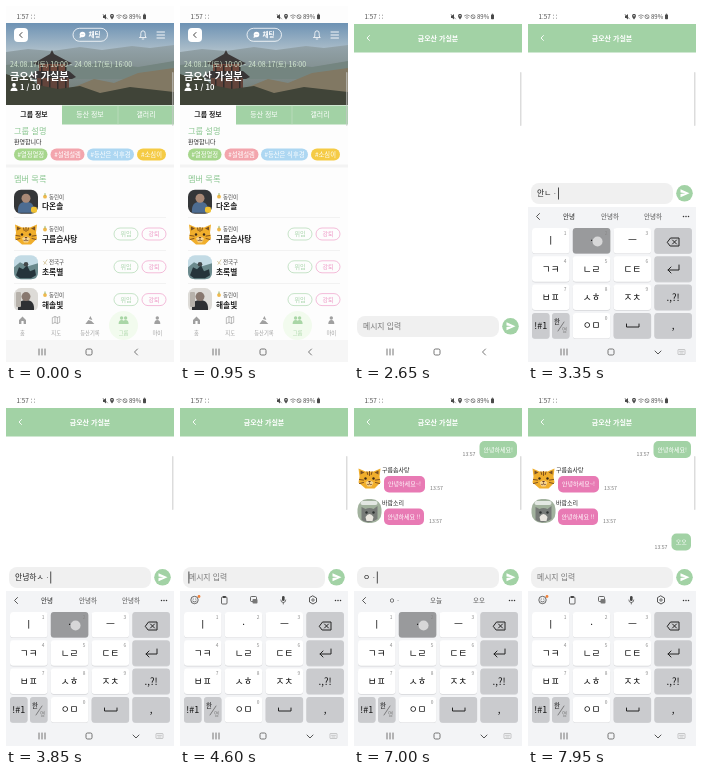
These frames come from a looping animation (168 by 356 pixels, 8000 ms). An HTML page:

```html
<!DOCTYPE html>
<html lang="ko">
<head>
<meta charset="utf-8">
<style>
html, body { margin: 0; width: 100%; height: 100%; overflow: hidden; background: #fff; }
svg { display: block; width: 168px; height: 356px; font-family: "Noto Sans CJK KR", "Noto Sans CJK", sans-serif; white-space: pre; }
</style>
</head>
<body>
<svg id="stage" viewBox="0 0 168 356"></svg>
<script>
const LOOP = 8000;
const GREEN = '#a2d2a5', PINK = '#e87ab4', INK = '#222';
const stage = document.getElementById('stage');

// y is the vertical middle of the text
const text = (s, x, y, size, fill = INK, weight = 400, anchor = 'start') =>
  `<text x="${x}" y="${(y + size * .36).toFixed(2)}" font-size="${size}" fill="${fill}" font-weight="${weight}" text-anchor="${anchor}">${s}</text>`;
const mid = (s, x, y, size, fill, weight) => text(s, x, y, size, fill, weight, 'middle');
const rect = (x, y, w, h, fill, r = 0, extra = '') =>
  `<rect x="${x}" y="${y}" width="${w}" height="${h}" rx="${r}" fill="${fill}" ${extra}/>`;
const frame = (x, y, w, h, r, color, width = .8) => rect(x, y, w, h, 'none', r, `stroke="${color}" stroke-width="${width}"`);
const disc = (x, y, r, fill, extra = '') => `<circle cx="${x}" cy="${y}" r="${r}" fill="${fill}" ${extra}/>`;
const ring = (x, y, r, color, w = .8) => disc(x, y, r, 'none', `stroke="${color}" stroke-width="${w}"`);
const shape = (d, fill) => `<path d="${d}" fill="${fill}"/>`;
const line = (d, color, w = .8) =>
  `<path d="${d}" fill="none" stroke="${color}" stroke-width="${w}" stroke-linecap="round" stroke-linejoin="round"/>`;
const at = (x, y, body) => `<g transform="translate(${x} ${y})">${body}</g>`;

function statusBar() {
  const c = '#4a4a4a';
  return text('1:57', 10.5, 10.5, 6.3, c)
    + [25, 28].map(x => rect(x, 8.7, 1, 1, '#999') + rect(x, 11.7, 1, 1, '#999')).join('')
    + shape('M97 9.5h1.3l1.7-1.5v5.4l-1.7-1.5H97z', c) + line('M97 8.3l4.5 4.6', c, .6)
    + shape('M106 13.5c-3.2-3.6-1.8-5.6 0-5.6s3.200 2 0 5.600z', c) + disc(106, 9.8, .7, '#fff')
    + line('M110.5 9.7q2.500-2 5 0M111.7 11.2q1.300-1.200 2.600 0', c, .6) + disc(113, 12.5, .5, c)
    + ring(119, 10.7, 2, c, .6) + line('M117.7 9.400l2.600 2.600', c, .6)
    + text('89%', 123, 10.5, 6, c) + rect(137, 8.4, 3, 4.8, c, .7) + rect(137.9, 7.7, 1.2, 1, c);
}

const systemNav = typing =>
  [33, 36, 39].map(x => line(`M${x} 343v6`, '#555', .8)).join('')
  + frame(80, 343, 6, 6, 1.5, '#555')
  + (typing
    ? line('M127 345l3 3 3-3', '#444', .9) + frame(150, 343.5, 7, 5, .6, '#999', .5) + line('M152 347h3M151.5 345.3h4', '#999', .5)
    : line('M131.5 343l-3 3 3 3', '#555', .8));
const edgeHandle = rect(166, 66, 1.5, 54, '#c9c9c9', .7, 'opacity=".65"');

const tiger = shape('M2 10L1 2l7 3h8l7-3-1 8 1 6-6 6H8l-7-6z', '#f0ae2c')
  + shape('M3 8V4l4 2zM21 8V4l-4 2z', '#7a5122')
  + line('M12 5v4M9.5 5.5l.7 2.5M14.5 5.5l-.7 2.5M2 13l4 .6M2 17l4-1M22 13l-4 .6M22 17l-4-1', '#80511d', 1)
  + shape('M8 16q4-4 8 0l-2 4h-4z', '#f8d58b') + disc(8, 12, 1.2, '#3b2a18') + disc(16, 12, 1.2, '#3b2a18')
  + shape('M10.5 14.5h3L12 16.3z', '#5a2f25') + line('M9.8 18q2.2 1.2 2.2-1.2 0 2.4 2.2 1.2', '#5a2f25', .6);

const photo = (back, body, face) => rect(0, 0, 24, 24, back, 7)
  + shape('M4 23q-1-11 8-11t8 11z', body) + disc(12, 8.5, 4.5, face);
const hiker = photo('#343638', '#4d6c91', '#a98976') + rect(17, 17, 6, 6, '#f1c232', 2);
const road = rect(0, 0, 24, 24, '#c3dbe5', 7) + shape('M0 12l6-5 8 4 10-3v9q0 7-7 7H7q-7 0-7-7z', '#6b8a8d')
  + shape('M2 20l3-8 4 2 4-4 3 6 5-2 1 6-5 3H6z', '#25343b') + disc(12, 9, 2.3, '#43484a');
const climber = photo('#dddbd7', '#2e3033', '#88786f') + rect(2, 4, 5, 15, '#b7b2ab', 1);
const grayCat = rect(0, 0, 24, 24, '#a2b29e', 10) + shape('M4 21V8l4 2q4-2 8 0l4-3v13q-8 6-16 1z', '#777b78')
  + shape('M8 18q4-6 8 0l-1 4H9z', '#e9e6df') + disc(9, 13.5, 1.2, '#2d3231') + disc(16, 13.5, 1.2, '#2d3231')
  + rect(3, 2, 17, 4, '#e3e8e3', 2);

const gradient = (id, from, to) =>
  `<linearGradient id="${id}" x2="0" y2="1"><stop stop-color="${from}"/><stop offset="1" stop-color="${to}"/></linearGradient>`;

const pavilion = shape('M46 44l2 4 15 8 3 1-4 2H31l-4-2 3-1 14-8z', '#3b3737')
  + rect(33, 58, 27, 9, '#70483c') + shape('M30 65h33l7 6-4 2H28l-4-2z', '#393637') + rect(31, 72, 32, 13, '#62443b')
  + [35, 43, 51, 59].map(x => rect(x, 59, 1.5, 26, '#302c2b')).join('');

const scenery = () => `<defs>${gradient('sky', '#6d92b4', '#b9c7ce')}${gradient('plain', '#93a3aa', '#6b756c')}</defs>`
  + rect(0, 17, 168, 33, 'url(#sky)')
  + shape('M0 46l22-3 24 2 28-4 22 3 30-4 18 2 24-3v60H0z', 'url(#plain)')
  + shape('M0 59l26-3 30 5 38-4 38 4 36-6v18H0z', '#748580')
  + shape('M66 82l22-9 20 4 24-10 36-5v37H60z', '#817863')
  + pavilion
  + shape('M0 68l12 4 8-3 12 10 20 4 22-3 20 7 30-6 44 5v13H0z', '#404438');

function hero() {
  return scenery()
    + rect(8, 22, 14, 14, '#fff', 4) + line('M16 26.5l-2.5 2.5 2.5 2.5', '#444', 1)
    + frame(67, 22.3, 34.5, 13, 6.5, '#fff', .8) + disc(76.5, 28.5, 2.8, '#fff') + shape('M74 29.5l-.5 2.5 2.5-1z', '#fff')
    + [75.2, 76.5, 77.8].map(x => disc(x, 28.5, .35, '#6f8ca5')).join('')
    + mid('채팅', 88.5, 28.7, 6.5, '#fff', 700)
    + line('M133.8 31.5h6.4l-1-1.5v-2.5q0-2.7-2.2-2.7t-2.2 2.7V30zM136.2 33h1.6', '#fff', .8)
    + line('M151 26h7.5M151 29h7.5M151 32h7.5', '#fff', .9)
    + text('24.08.17(토) 10:00 - 24.08.17(토) 16:00', 4, 58.8, 7, '#d5ead2')
    + text('금오산 가실분', 4, 70, 10.1, '#fff', 700)
    + disc(8, 79, 1.9, '#fff') + shape('M4.5 85q0-3.5 3.5-3.5t3.5 3.5z', '#fff')
    + text('1 / 10', 14, 81.3, 7.5, '#fff', 700);
}

const chips = [['#열정열정', 8, 33.5, '#a6d68c'], ['#설렘설렘', 44.5, 34, '#f3a5ad'], ['#등산은 식후경', 81, 47, '#add7f2'], ['#소심이', 131, 29, '#f5cb45']];
const members = [['동린이', '다온솔', hiker], ['동린이', '구름솜사탕', tiger], ['전국구', '초록별', road], ['동린이', '해솔빛', climber]];

function memberRow([level, name, avatar], i) {
  const y = 183.7 + i * 32.8;
  const pill = (label, x, c) => frame(x, y + 5.5, 24, 12, 6, c, .6) + mid(label, x + 12, y + 11.5, 6, c);
  const badge = i === 2 ? line('M38 9l3-4.5M37.5 6l3 3', '#c9b685', .7) : disc(39, 7, 1.9, '#efb84b') + line('M39 5.5V3.8', '#8eae5d', .9);
  return at(8, y, avatar) + at(0, y, badge) + text(level, 43, y + 7, 5.5, '#444', 500) + text(name, 36, y + 17, 7.7, INK, 700)
    + (i ? pill('위임', 108, '#a2d2a5') + pill('강퇴', 136, '#ed91c2') : '')
    + (i < 3 ? rect(8, y + 27.7, 152, .5, '#e6e6e6') : '');
}

function bottomNav() {
  const c = '#a0a0a0', active = '#a9d6a6';
  const person = (x, color) => disc(x, -2, 1.7, color) + shape(`M${x - 3} 4q0-4 3-4t3 4z`, color);
  const items = [
    ['홈', shape('M-3.5 0L0-3.5 3.5 0v4h-2.4V1h-2.2v3h-2.4z', c)],
    ['지도', line('M-3.500-2.500l2.300-1 2.400 1 2.300-1v6l-2.300 1-2.400-1-2.300 1zM-1.200-3.500v6M1.200-2.500v6', c, .7)],
    ['등산기록', shape('M-4.5 4l3-4 3 1 3 3zM-1-1l1.500-3 2 4z', c)],
    ['그룹', person(-2, active) + person(2, active)],
    ['마이', person(0, c)],
  ];
  return rect(0, 304, 168, 30, '#fdfdfd') + rect(0, 334, 168, 22, '#f6f6f6') + disc(117.5, 319.5, 14.5, '#f2fbee')
    + items.map(([label, icon], i) => {
      const x = 16.5 + i * 33.7;
      return at(x, 314, icon) + mid(label, x, 327, 5.3, i === 3 ? active : c);
    }).join('') + systemNav(false);
}

const groupScreen = () => rect(0, 0, 168, 356, '#fdfdfd') + statusBar() + hero()
  + rect(0, 99.5, 56, 19, '#fdfdfd') + rect(56, 99.5, 112, 19, GREEN) + rect(111.7, 99.5, .6, 19, '#c5e2c7')
  + mid('그룹 정보', 28, 109, 6.9, INK, 700) + mid('등산 정보', 84, 109, 6.9, '#fff') + mid('갤러리', 140, 109, 6.9, '#fff')
  + text('그룹 설명', 8, 125.5, 8.2, '#8cc792', 500) + text('환영합니다', 8, 136, 6)
  + chips.map(([s, x, w, c]) => rect(x, 142.5, w, 12, c, 6) + mid(s, x + w / 2, 148.5, 6.3, '#fff')).join('')
  + rect(0, 158.5, 168, 3, '#f3f3f3') + text('멤버 목록', 8, 173, 8.2, '#8cc792', 500)
  + members.map(memberRow).join('') + bottomNav() + edgeHandle;

// [key, text after the tap]
const hello = [['0', 'ㅇ'], ['1', '이'], ['2', '아'], ['5', '안'], ['5', '안ㄴ'], ['2', '안ㄴㆍ'], ['2', '안ㄴ‥'], ['1', '안녀'], ['0', '안녕'],
  ['8', '안녕ㅅ'], ['8', '안녕ㅎ'], ['1', '안녕히'], ['2', '안녕하'], ['8', '안녕핫'], ['2', '안녕하ㅅㆍ'], ['1', '안녕하서'], ['1', '안녕하세'],
  ['0', '안녕하셍'], ['2', '안녕하세ㅇㆍ'], ['2', '안녕하세ㅇ‥'], ['3', '안녕하세요'], ['.', '안녕하세요!']];
const reply = [['0', 'ㅇ'], ['2', 'ㅇㆍ'], ['3', '오'], ['0', '옹'], ['2', '오ㅇㆍ'], ['3', '오오']];
const CHAT = 2600, FOCUS = 2750, SENT = 4400, REPLY = 6900, REPLY_SENT = 7600;
const taps = [
  ...hello.map(([key, value], i) => ({ key, value, time: i < 6 ? 2960 + i * 70 : 3310 + (i - 5) * 56 })),
  ...reply.map(([key, value], i) => ({ key, value, time: REPLY + i * 95 })),
];

function typingAt(t) {
  const tap = taps.filter(p => p.time <= t).pop();
  const sent = t >= SENT && t < REPLY || t >= REPLY_SENT;
  if (!tap || sent) return { value: '', pressed: null, since: t >= REPLY_SENT ? REPLY_SENT : t >= SENT ? SENT : FOCUS };
  return { value: tap.value, pressed: t - tap.time < 52 ? tap.key : null, since: tap.time };
}

const dots = [155.5, 158, 160.5].map(x => disc(x, 210.5, .75, '#333')).join('');

function toolbar(value) {
  if (value) {
    const words = value[0] === '안' ? ['안녕', '안녕하', '안녕하'] : [value, '오늘', '오오'];
    return line('M11.5 207.5l-3 3 3 3', '#444', .9) + words.map((w, i) => mid(w, [41, 82, 125][i], 210.5, 6.5, i ? '#555' : INK)).join('') + dots;
  }
  const c = '#444';
  return ring(14.5, 210, 3.7, c) + disc(13.2, 209, .5, c) + disc(15.8, 209, .5, c) + line('M12.7 211.2q1.8 1.7 3.6 0', c, .7) + disc(19, 206.5, 1.4, '#f0813a')
    + frame(41.5, 207, 5.5, 7, 1, c) + rect(42.8, 206, 3, 2, c)
    + frame(70.5, 206.5, 6, 5, 1, c) + rect(72.5, 209, 5, 4.5, '#777', 1)
    + rect(102, 206, 2.6, 5, c, 1.3) + line('M100.8 210q0 2.5 2.5 2.5t2.5-2.5M103.3 212.5v1.5', c, .7)
    + line('M133 206l3.5 2v4l-3.5 2-3.5-2v-4z', c, .9) + ring(133, 210, 1.2, c) + dots;
}

function keyboard(value, pressed) {
  const labels = { 1: 'ㅣ', 2: '·', 3: 'ㅡ', 4: 'ㄱㅋ', 5: 'ㄴㄹ', 6: 'ㄷㅌ', 7: 'ㅂㅍ', 8: 'ㅅㅎ', 9: 'ㅈㅊ', 0: 'ㅇㅁ', '.': '.,?!' };
  const key = (id, x, y, w = 37.5, fill = '#fff') => {
    const down = pressed === id;
    return rect(x, y + .6, w, 25.5, '#d5d6d9', 3) + rect(x, y, w, 25.5, down ? '#999a9c' : fill, 3)
      + (down ? disc(x + w / 2 + 6, y + 13.5, 5, '#d7d7d8') : '')
      + (labels[id] ? mid(labels[id], x + w / 2, y + 13, 9.7, '#111', 500) : '')
      + (/\d/.test(id) ? text(id, x + w - 3, y + 5, 4.8, '#888', 400, 'end') : '');
  };
  const gray = '#cacbce', col = i => 4 + i * 40.8, row = i => 222 + i * 28.3;
  let out = rect(0, 201, 168, 155, '#f3f4f6') + toolbar(value);
  for (let i = 0; i < 9; i++) out += key(String(i + 1), col(i % 3), row(Math.floor(i / 3)));
  ['back', 'enter', '.'].forEach((id, i) => out += key(id, col(3), row(i), 37.5, gray));
  return out + key('sym', 4, row(3), 17.5, gray) + key('lang', 24, row(3), 17.5, gray)
    + key('0', col(1), row(3)) + key('space', col(2), row(3), 37.5, gray) + key('comma', col(3), row(3), 37.5, gray)
    + line('M139.5 236l3-4h8.5v8h-8.5zM144.5 234l4 4m0-4l-4 4', '#222', 1)
    + line('M151 259v5h-11m3-3l-3 3 3 3', '#222', 1)
    + mid('!#1', 12.7, row(3) + 13, 9, '#111') + text('한', 26, row(3) + 9, 6.5, '#111') + line('M30 325l6-9', '#444', .6) + text('영', 34, row(3) + 17, 5.5, '#777')
    + line('M98.5 318v3h12.5v-3', '#222', 1) + mid(',', 145.2, row(3) + 12, 10, '#111') + systemNav(true);
}

function inputBar(y, value, caret) {
  const width = [...value].reduce((w, c) => w + (c > '\u1100' ? .92 : c === '‥' ? .9 : .32), 0) * 7.8;
  return rect(3, y, 142, 21, '#f0f0f0', 8) + text(value || '메시지 입력', 9, y + 10.5, 7.8, value ? INK : '#777')
    + (caret ? rect(8.5 + width, y + 4.5, .8, 12, '#222') : '')
    + disc(156.5, y + 10.3, 8.3, GREEN) + shape(`M152.5 ${y + 6.3}l9 4-9 4v-3.2l5-.8-5-.8z`, '#fff');
}

const stamp = (x, y) => text('13:57', x, y, 5.2, '#777');
const sentBubble = (s, y, w) => rect(163 - w, y, w, 17, GREEN, 5) + mid(s, 163 - w / 2, y + 8.5, 6, '#fff') + stamp(146 - w, y + 13.5);
const receivedBubble = (avatar, name, s, y, w) => at(3.5, y, avatar) + text(name, 28, y + 3.7, 6)
  + rect(30, y + 9.5, w, 16.5, PINK, 5) + mid(s, 30 + w / 2, y + 17.7, 6, '#fff') + stamp(35 + w, y + 22);

function chatScreen(t) {
  const { value, pressed, since } = typingAt(t);
  const open = Math.min(1, Math.max(0, (t - FOCUS) / 150));
  const lift = Math.round(133 * (1 - (1 - open) ** 3));
  const caret = open === 1 && (t - since) % 600 < 300;
  return rect(0, 0, 168, 356, '#fff') + statusBar() + rect(0, 18, 168, 28.5, GREEN)
    + line('M15.5 29.5l-2.5 2.5 2.5 2.5', '#fff', .9) + mid('금오산 가실분', 84, 32, 7, '#fff', 700)
    + (t >= 4850 ? sentBubble('안녕하세요!', 51, 37.5) : '')
    + (t >= 6150 ? receivedBubble(tiger, '구름솜사탕', '안녕하세요~!', 76.5, 41) : '')
    + (t >= 6550 ? receivedBubble(grayCat, '바람소리', '안녕하세요 !!', 109, 40) : '')
    + (t >= REPLY_SENT ? sentBubble('오오', 143.5, 19.5) : '')
    + systemNav(false) + inputBar(310 - lift, value, caret)
    + (open ? at(0, 133 - lift, keyboard(value, pressed)) : '') + edgeHandle;
}

let shown = '';
const start = performance.now();
function draw() {
  const t = (performance.now() - start) % LOOP;
  const picture = t < CHAT ? groupScreen() : chatScreen(t);
  if (picture !== shown) stage.innerHTML = shown = picture;
  requestAnimationFrame(draw);
}
draw();
</script>
</body>
</html>
```
